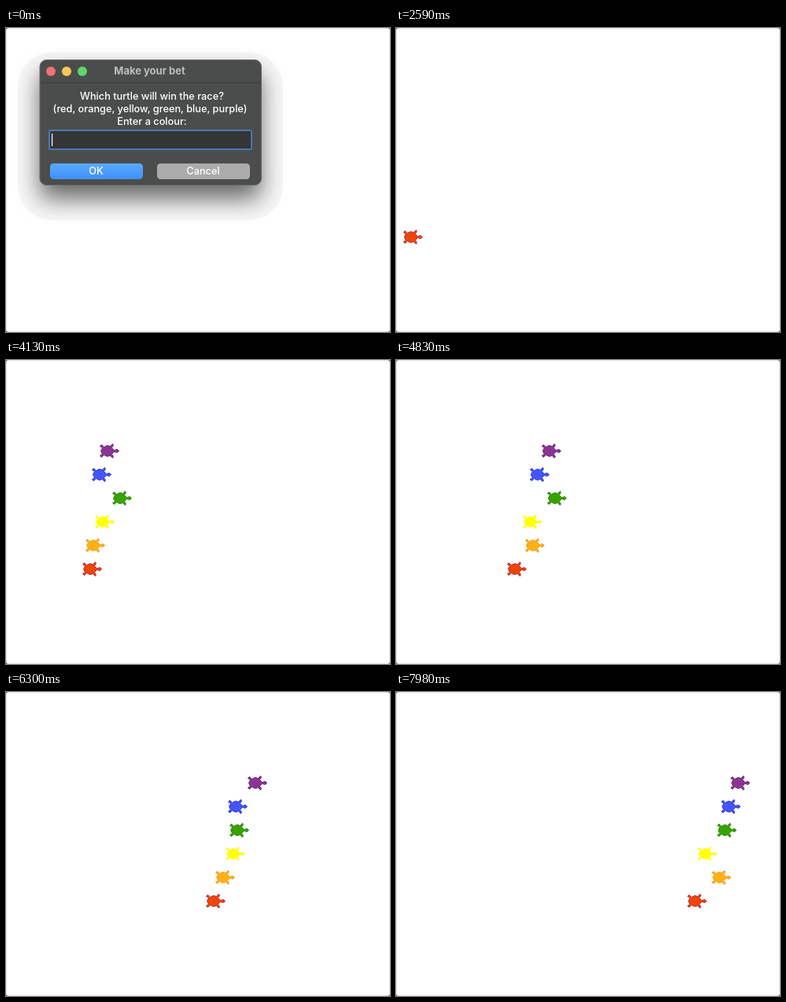
Recreate the animation shown at these times as an HTML page. Size 488x386 px, loop 8000 ms.

```html
<!DOCTYPE html>
<html lang="en">
<head>
<meta charset="utf-8">
<title>Turtle race</title>
<style>
  html, body { margin: 0; width: 100%; height: 100%; overflow: hidden; background: #666; }
  #stage { display: block; width: 488px; height: 386px; }
  text { font: 500 12.75px Inter, "Open Sans", sans-serif; fill: #fff; }
  .mid { text-anchor: middle; }
  .title { font-size: 13px; font-weight: 700; fill: #bdbdbd; }
</style>
</head>
<body>
<svg id="stage" viewBox="0 0 488 386">
  <defs>
    <filter id="blur" x="-30%" y="-45%" width="160%" height="190%">
      <feGaussianBlur stdDeviation="15"/>
    </filter>
    <linearGradient id="blue" x2="0" y2="1">
      <stop stop-color="#5aabff"/><stop offset="1" stop-color="#3f90fa"/>
    </linearGradient>
  </defs>

  <rect x=".5" y=".5" width="487" height="385" rx="2.5" fill="#fff" stroke="#e2e2e2"/>
  <g id="turtles"></g>

  <g id="dialog">
    <rect x="15" y="31" width="337" height="213" rx="44" fill="#f7f7f7"/>
    <rect x="43" y="57" width="281" height="160" rx="9" opacity=".58" filter="url(#blur)"/>
    <rect x="43" y="40.5" width="281.5" height="159" rx="8.5" fill="#4b4d4d" stroke="#696b6b"/>
    <path d="M44 69.5H324" stroke="#3d3f3f"/>
    <circle cx="57" cy="55" r="6" fill="#f07076"/>
    <circle cx="77" cy="55" r="6" fill="#f8c956"/>
    <circle cx="97" cy="55" r="6" fill="#5fd768"/>
    <text class="mid title" x="182.5" y="59">Make your bet</text>
    <text class="mid" x="185.5" y="91">Which turtle will win the race?</text>
    <text class="mid" x="183" y="107">(red, orange, yellow, green, blue, purple)</text>
    <text class="mid" x="185.5" y="123">Enter a colour:</text>
    <rect x="55" y="130" width="257" height="24" rx="1" fill="#343535" stroke="#4c76b0" stroke-width="2"/>
    <text id="entry" x="59" y="146.5"></text>
    <rect id="caret" y="134" width="1.2" height="16" fill="#fff"/>
    <rect x="56" y="172" width="118" height="20" rx="4.5" fill="url(#blue)"/>
    <rect x="192" y="172" width="118" height="20" rx="4.5" fill="#ababab"/>
    <text class="mid" x="114.5" y="186">OK</text>
    <text class="mid" x="250.5" y="186">Cancel</text>
  </g>
</svg>
<script>
const LOOP = 8000, STEP = 70, CLOSE = 2450, ARRIVE = 2590, START = 2940;
const $ = id => document.getElementById(id);

const WORD = 'green';
const keyTimes = [840, 1050, 1120, 1400, 2100];
const BLINK = 910, DARK = 350;

// Nose positions at a few shared checkpoints
const times = [START, 4130, 4830, 5670, 7000, 7980];
const racers = [
  { fill: '#f04408', line: '#a5323c', path: [33, 121, 165, 223, 338, 394] },
  { fill: '#ffb013', line: '#e6a53c', path: [33, 125, 188, 241, 345, 425] },
  { fill: '#ffff00', line: '#ffff66', path: [33, 137, 185, 261, 347, 407] },
  { fill: '#38a200', line: '#348618', path: [33, 159, 216, 270, 353, 432] },
  { fill: '#4455ff', line: '#3039b4', path: [33, 133, 194, 259, 358, 437] },
  { fill: '#8c3493', line: '#692a70', path: [33, 143, 209, 281, 388, 449] }
];

// Half of the shell, nose to tail; the other half mirrors it
const half = [[16, 0], [14, 2], [10, 1], [7, 4], [9, 7], [8, 9], [5, 6], [1, 7], [-3, 5], [-6, 8], [-8, 6], [-5, 4], [-7, 0]];
const shell = half.concat(half.slice(1, -1).reverse().map(([x, y]) => [x, -y])).join(' ');

racers.forEach((r, i) => {
  r.y = 265.5 - 30 * i;
  r.el = document.createElementNS('http://www.w3.org/2000/svg', 'polygon');
  r.el.setAttribute('points', shell);
  r.el.setAttribute('fill', r.fill);
  r.el.setAttribute('stroke', r.line);
  $('turtles').append(r.el);
});

function noise(a, b) {
  const v = Math.sin(a * 12.9898 + b * 78.233) * 43758.5453;
  return v - Math.floor(v) - 0.5;
}

// Uneven hops between the checkpoints
function noseAt(path, seed, t) {
  if (t <= START) return path[0];
  const k = times.findIndex(end => t <= end);
  const p = (t - times[k - 1]) / (times[k] - times[k - 1]);
  const x = path[k - 1] + (path[k] - path[k - 1]) * p;
  return Math.round(x + (p < 1 ? 3 * noise(seed, t / STEP) : 0));
}

const show = (el, on) => el.setAttribute('visibility', on ? 'visible' : 'hidden');

function draw(now) {
  const t = Math.floor((now % LOOP) / STEP + 1e-6) * STEP;
  const open = t < CLOSE;
  $('dialog').style.display = open ? '' : 'none';
  if (open) {
    $('entry').textContent = WORD.slice(0, keyTimes.filter(k => t >= k).length);
    $('caret').setAttribute('x', 58 + $('entry').getComputedTextLength());
    show($('caret'), (t + 420) % BLINK >= DARK);
  }
  racers.forEach((r, i) => {
    show(r.el, t >= ARRIVE + STEP * i);
    r.el.setAttribute('transform', `translate(${noseAt(r.path, i + 1, t) - 15.5} ${r.y})`);
  });
}

function tick() {
  draw(performance.now());
  requestAnimationFrame(tick);
}
tick();
</script>
</body>
</html>
```
